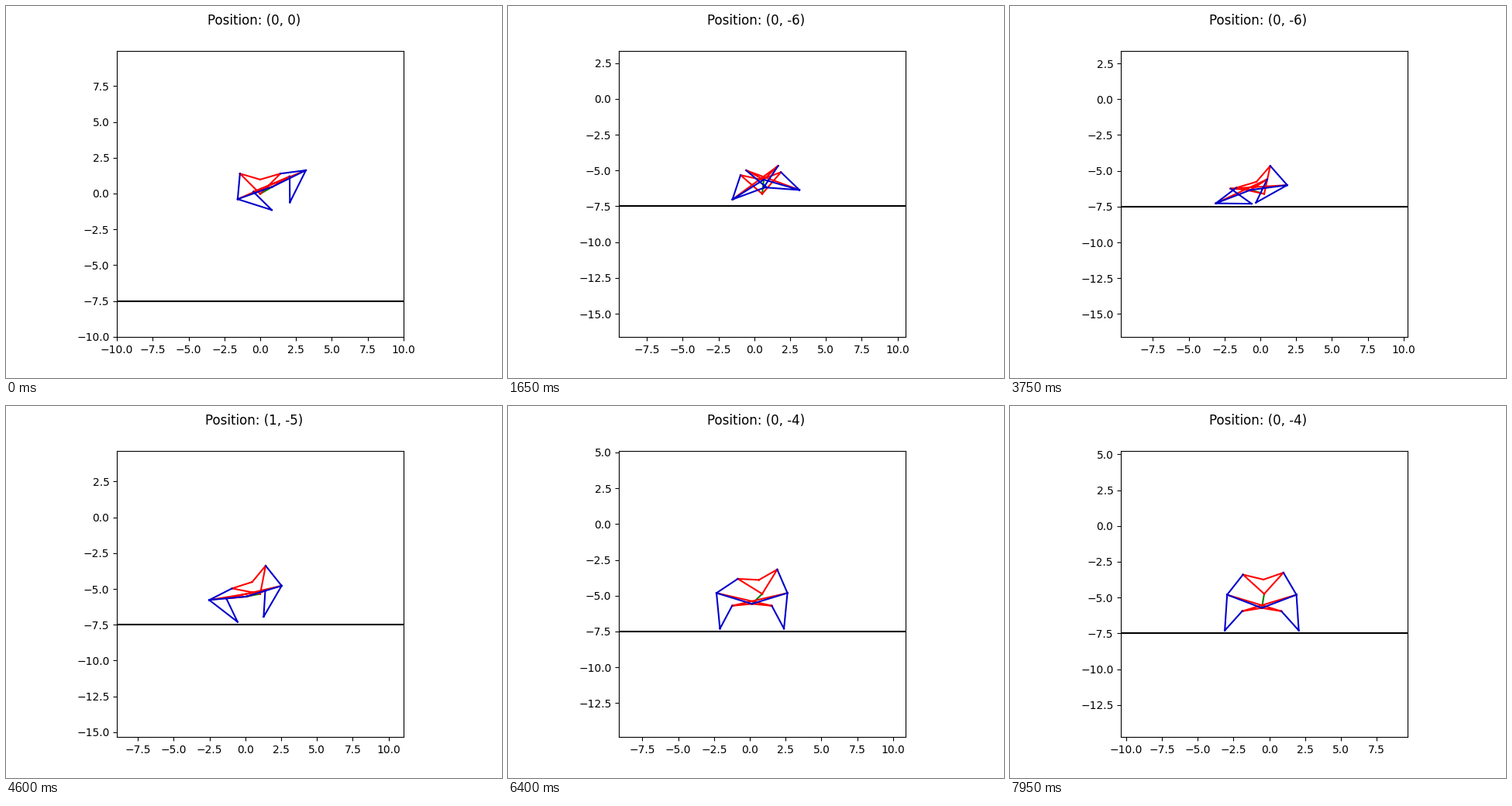
Write a matplotlib script that moves like this. It is 640 px wide and 480 px high and loops after 8000 ms.

```python
import numpy as np
import matplotlib.pyplot as plt
from matplotlib.animation import FuncAnimation

STEP = 50                 # ms per frame
DT = STEP / 1000
FRAMES = 160
GROUND = -7.5
FOOT = 0.2                # contact radius of the joints
GRAVITY = 9.8
VIEW = 10

# link lengths
CRANK, ROCKER, THIGH, HIP, SHIN, ANKLE = 1.0, 1.79, 2.59, 1.39, 2.5, 1.81
BEND = np.radians(168.5)  # angle between thigh and hip arm

LAND, HOP_TIME, HOP = 1.1, 1.1, 0.18
REST = -6.81              # height of the body while it lies folded


def ease(t, start, span):
    u = np.clip((t - start) / span, 0, 1)
    return u * u * (3 - 2 * u)


def crank_angle(t):
    """Steady motor that loses a little under load."""
    return np.radians(30 + 30 * t - 11 * ease(t, 2.6, 1.1))


def tilt_angle(t):
    """Slow rocking, then the body is pushed over to the left."""
    return np.radians(5 * np.sin(np.pi * t / 2.4) + 37.7 * ease(t, 2.6, 1.15))


def drift(t):
    return (0.78 * ease(t, 0.75, 1.4) - 0.51 * ease(t, 2.5, 1.25)
            + 0.88 * ease(t, 3.75, 1.1) - 1.51 * ease(t, 5.9, 1.8))


def height(t, floor):
    """Free fall, a small hop, then the legs lift the body."""
    fall = -GRAVITY / 2 * (t + DT) * (t + 2 * DT)
    hop = REST + HOP * np.sin(np.pi * np.clip((t - LAND) / HOP_TIME, 0, 1))
    return max(fall, hop, floor)


def meet(p, r, q, s, side):
    """Point at distance r from p and s from q, left (1) or right (-1) of pq."""
    gap = abs(q - p)
    along = (r * r - s * s + gap * gap) / (2 * gap)
    up = np.sqrt(max(r * r - along * along, 0))
    return p + (q - p) / gap * (along + 1j * side * up)


def linkage(theta):
    """Joints around the body centre, as complex numbers."""
    crank = CRANK * np.exp(1j * theta)
    j = {"body": 0j, "neck": 1j, "crank": crank}
    sides = (("l", -1), ("r", 1))
    for s, side in sides:
        j["shoulder" + s] = np.sqrt(2) * (side + 1j)
        knee = meet(j["shoulder" + s], ROCKER, crank, THIGH, side)
        arm = (knee - crank) / abs(knee - crank) * np.exp(1j * side * BEND)
        j["knee" + s] = knee
        j["hip" + s] = crank + HIP * arm
    for (s, side), other in zip(sides, "rl"):
        j["foot" + s] = meet(j["knee" + s], SHIN, j["hip" + other], ANKLE, side)
    return j


def pose(t):
    j = linkage(crank_angle(t))
    # once both feet are down they keep level with the ground
    level = -np.angle(j["footr"] - j["footl"])
    tilt = tilt_angle(t)
    tilt += (level - tilt) * ease(t, 4.48, 0.45)
    j = {name: p * np.exp(1j * tilt) for name, p in j.items()}
    floor = GROUND + FOOT - min(p.imag for p in j.values())
    centre = drift(t) + 1j * height(t, floor)
    return {name: p + centre for name, p in j.items()}


def links(*chains):
    return [pair for c in chains for pair in zip(c.split(), c.split()[1:])]


PARTS = {
    "green": links("body crank"),
    "red": links("shoulderl neck shoulderr body shoulderl",
                 "kneel hipl crank hipr kneer"),
    "mediumblue": links("shoulderl kneel footl hipr",
                        "shoulderr kneer footr hipl", "kneel crank kneer"),
}

fig, ax = plt.subplots(figsize=(6.4, 4.8), dpi=100)
ax.set_aspect("equal")
ax.axhline(GROUND, color="black")
lines = {color: ax.plot([], [], color=color)[0] for color in PARTS}
title = fig.suptitle("Position: (0, 0)")


def draw(n):
    j = pose(n * DT)
    for color, pairs in PARTS.items():
        pts = np.array([p for a, b in pairs
                        for p in (j[a], j[b], complex(np.nan, np.nan))])
        lines[color].set_data(pts.real, pts.imag)
    x, y = j["body"].real, j["body"].imag
    ax.set_xlim(x - VIEW, x + VIEW)
    ax.set_ylim(y - VIEW, y + VIEW)
    title.set_text(f"Position: ({int(x)}, {int(y)})")
    return [*lines.values(), title]


anim = FuncAnimation(fig, draw, frames=FRAMES, interval=STEP, repeat=True,
                     repeat_delay=0, cache_frame_data=False)
plt.show()
```
